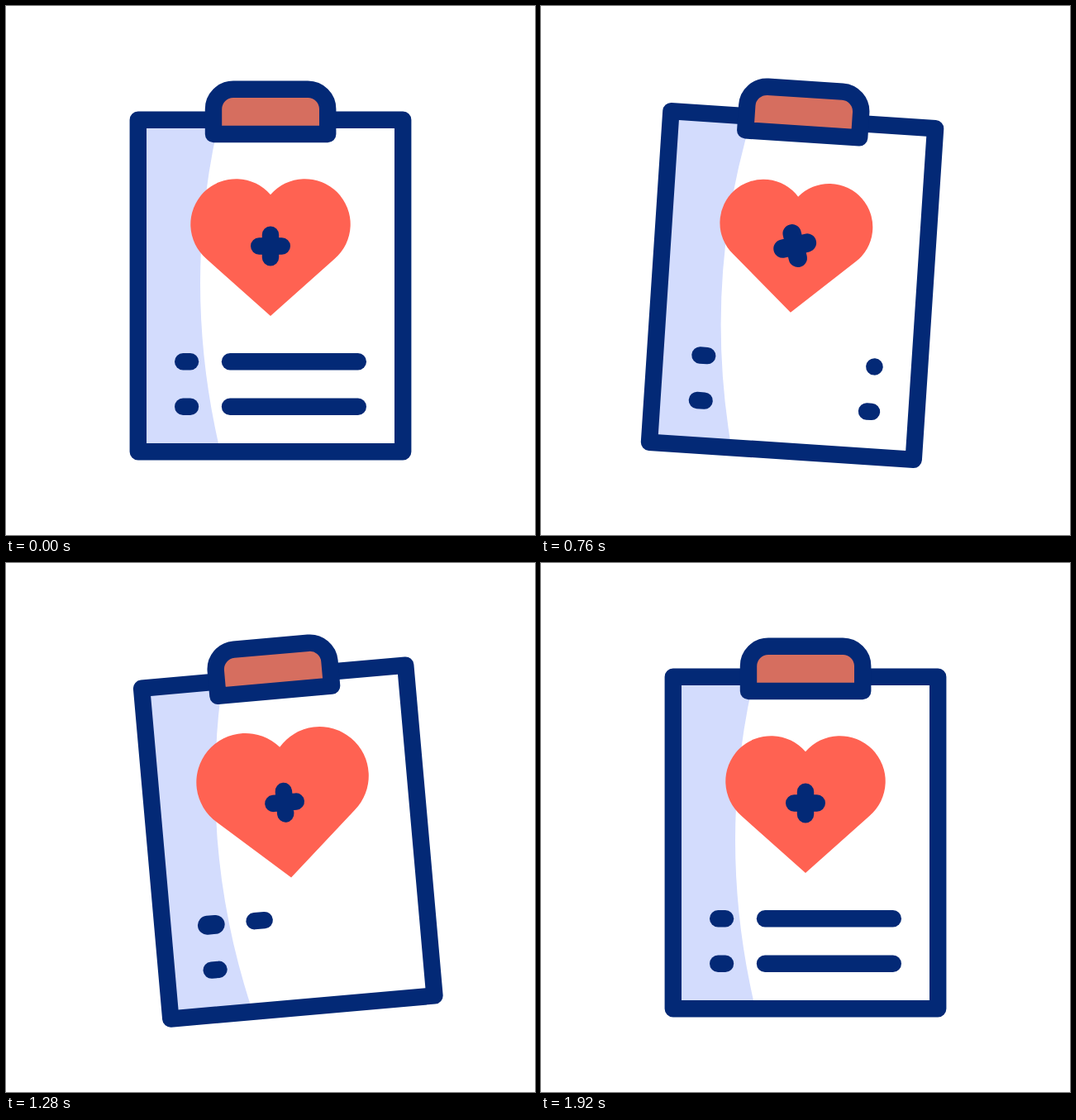
These frames come from a looping animation (640 px wide and 640 px high, 2 s). An HTML page:

```html
<!DOCTYPE html>
<html lang="en">
<head>
<meta charset="utf-8">
<title>Health clipboard</title>
<style>
  html, body { margin: 0; width: 100%; height: 100%; overflow: hidden; background: #fff; }
  svg { display: block; width: 100%; height: 100%; }
  .ink { fill: none; stroke: #032976; stroke-width: 20.4; stroke-linecap: round; stroke-linejoin: round; }
</style>
</head>
<body>
<svg viewBox="0 0 640 640">
  <g id="board">
    <path fill="#d3dcfd" d="M160 138H258Q211.4 338 259.3 539H160Z"/>
    <rect class="ink" x="159.8" y="137.8" width="320.4" height="401.4"/>
    <path class="ink" style="fill:#d66e5f" d="M251 155V124.7a24 24 0 0 1 24-24H365.2a24 24 0 0 1 24 24V155Z"/>
    <path id="heart" fill="#ff6252" d="M320 375L242.6 306A55 55 0 1 1 320 228.3A55 55 0 1 1 397.4 306Z"/>
    <path id="plus" class="ink" d="M306.2 290.5h27.6M320 276.7v27.6"/>
    <g id="rows"></g>
  </g>
</svg>
<script>
  const LOOP = 2000, STEP = 40, OUT = 200, BACK = 1200;
  const $ = id => document.getElementById(id);

  // Bezier easing with handles (x1, 0) and (x2, 1)
  function ease(u, [x1, x2] = [0.335, 0.128]) {
    if (u <= 0) return 0;
    if (u >= 1) return 1;
    let lo = 0, hi = 1, s;
    for (let i = 0; i < 24; i++) {
      s = (lo + hi) / 2;
      const w = 1 - s;
      if (3 * s * w * (x1 * w + x2 * s) + s ** 3 < u) lo = s; else hi = s;
    }
    return s * s * (3 - 2 * s);
  }

  // Sums eased steps between keys { t, v, by }; "by" shapes the way into a key
  const track = keys => time => keys.slice(1).reduce((sum, { t, v, by }, i) => {
    const a = keys[i];
    return sum + (v - a.v) * ease((time - a.t) / (t - a.t), by);
  }, keys[0].v);

  const SOFT = [0.333, 0.33];
  const tilt = track([
    { t: OUT, v: 0 },
    { t: 690, v: 4.22, by: [0.03, 0.81] },
    { t: 1260, v: -5.05, by: [0.333, 0.44] },
    { t: 1880, v: 0 }
  ]);
  const beat = track([
    { t: OUT, v: 1 }, { t: 390, v: 0.905 }, { t: 670, v: 1.042 },
    { t: 885, v: 0.925 }, { t: 1260, v: 1.08 }, { t: 1860, v: 1 }
  ]);
  const spin = track([{ t: OUT, v: 0 }, { t: 880, v: 180, by: [0.24, 0.73] }]);
  const plusSize = track([
    { t: OUT, v: 1 }, { t: 410, v: 0.83, by: SOFT },
    { t: 880, v: 1.115, by: SOFT }, { t: 1300, v: 1, by: SOFT }
  ]);
  const wipe = t => ease(t / 600);
  const pulse = t => t > 0 && t < 400 ? 0.35 * Math.sin(Math.PI * t / 400) ** 2 : 0;

  function addPath() {
    const p = document.createElementNS("http://www.w3.org/2000/svg", "path");
    p.setAttribute("class", "ink");
    return $("rows").appendChild(p);
  }
  const rows = [0, 1].map(i => ({
    y: 430.2 + 54.6 * i, delay: 120 * i, dot: addPath(), line: addPath()
  }));

  const LEFT = 271, WIDTH = 154.8;
  const scaleAt = (x, y, s, deg = 0) =>
    `translate(${x} ${y}) rotate(${deg}) scale(${s}) translate(${-x} ${-y})`;

  function drawRow({ y, delay, dot, line }, t) {
    const out = t - OUT - delay, back = t - BACK - delay;
    dot.setAttribute("d", `M214.2 ${y}h8.8`);
    dot.setAttribute("transform", scaleAt(218.6, y, 1 + pulse(out) + pulse(back)));
    const from = back > 0 ? 0 : wipe(out);
    const to = back > 0 ? wipe(back) : 1;
    line.setAttribute("d", to > from ? `M${LEFT + WIDTH * from} ${y}H${LEFT + WIDTH * to}` : "");
  }

  function draw(t) {
    $("board").setAttribute("transform", `rotate(${tilt(t)} 320 96)`);
    $("heart").setAttribute("transform", scaleAt(320, 291, beat(t)));
    $("plus").setAttribute("transform", scaleAt(320, 290.5, plusSize(t), spin(t)));
    rows.forEach(r => drawRow(r, t));
  }

  const start = performance.now();
  function tick() {
    const t = (performance.now() - start) % LOOP;
    draw(Math.floor(t / STEP) * STEP);
    requestAnimationFrame(tick);
  }
  tick();
</script>
</body>
</html>
```
